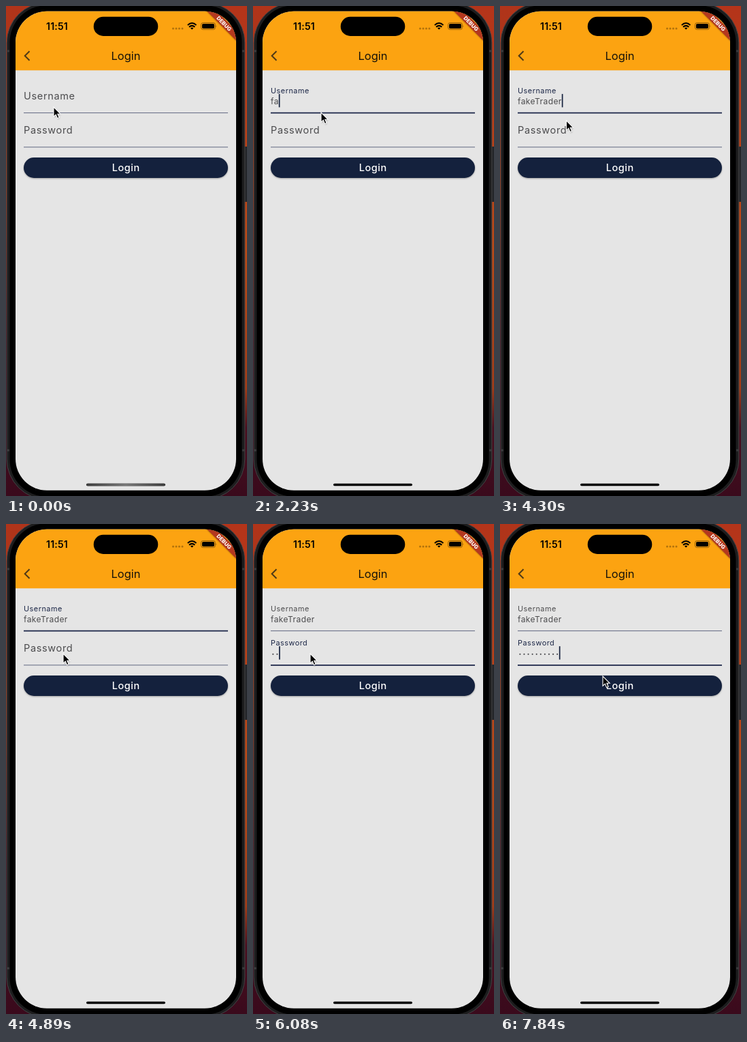
An HTML page that plays this animation: 354 px wide and 718 px high, repeating every 7.99 s.

```html
<!DOCTYPE html>
<html lang="en">
<head>
<meta charset="utf-8">
<title>Login</title>
<style>
  html, body { margin: 0; width: 100%; height: 100%; overflow: hidden; background: #2a0a16; }
  svg { display: block; width: 354px; height: 718px; font-family: Inter, "Open Sans", sans-serif; }
  .label { font-size: 14.5px; letter-spacing: .66px; }
  .value { font-size: 12px; letter-spacing: .42px; fill: #4c4c4e; }
</style>
</head>
<body>
<svg viewBox="0 0 354 718">
  <defs>
    <linearGradient id="wallLeft" x2="0" y2="1">
      <stop offset="0" stop-color="#b0341a"/><stop offset=".35" stop-color="#a83c18"/>
      <stop offset=".7" stop-color="#4a1020"/><stop offset="1" stop-color="#3a0a1c"/>
    </linearGradient>
    <linearGradient id="wallRight" x2="0" y2="1">
      <stop offset="0" stop-color="#b4341a"/><stop offset=".5" stop-color="#b84a18"/>
      <stop offset=".78" stop-color="#a03c18"/><stop offset=".86" stop-color="#4a1020"/>
      <stop offset="1" stop-color="#3a0a1c"/>
    </linearGradient>
    <linearGradient id="shine">
      <stop offset="0" stop-color="#3c3c3c"/><stop offset=".5" stop-color="#777"/><stop offset="1" stop-color="#3c3c3c"/>
    </linearGradient>
    <clipPath id="screen"><rect x="14" y="7.7" width="324" height="702" rx="46"/></clipPath>
    <filter id="soft" x="-20%" y="-60%" width="140%" height="220%"><feGaussianBlur stdDeviation="1.2"/></filter>
  </defs>

  <!-- wallpaper and phone body -->
  <rect width="177" height="718" fill="url(#wallLeft)"/>
  <rect x="177" width="177" height="718" fill="url(#wallRight)"/>
  <path d="M350 206h4v81h-4z" fill="#24262a"/>
  <rect x="1.2" y="-5" width="349.6" height="728" rx="59" fill="#1d1d1e" stroke="#434345"/>
  <rect x="5.5" y="-.8" width="341" height="719.6" rx="54" fill="#000"/>
  <path d="M1 66h4M347 66h4M1 651h4M347 651h4" stroke="#3a3a3c" stroke-width="3"/>

  <!-- app background, bar and debug ribbon -->
  <g clip-path="url(#screen)">
    <rect x="14" y="7" width="324" height="704" fill="#e5e5e5"/>
    <rect x="14" y="7" width="324" height="87.3" fill="#fca311"/>
    <g transform="translate(338 8) rotate(45)">
      <rect x="-36" y="20" width="72" height="10" opacity=".5" filter="url(#soft)"/>
      <rect x="-36" y="20" width="72" height="10" fill="#b4381f"/>
      <text y="27.9" font-size="7.8" font-weight="800" fill="#fff" text-anchor="middle">DEBUG</text>
    </g>
  </g>

  <!-- status bar -->
  <text x="75" y="34.6" font-size="14.1" font-weight="600" letter-spacing=".15" text-anchor="middle">11:51</text>
  <rect x="128.7" y="15.8" width="94.6" height="28.2" rx="14.1"/>
  <path d="M245.5 33h14" stroke="#000" stroke-opacity=".3" stroke-width="3" stroke-linecap="round" stroke-dasharray="0 4.5"/>
  <path d="M266.9 28Q273.2 22 279.5 28M269 30.7Q273.2 27 277.4 30.7" fill="none" stroke="#000" stroke-width="2"/>
  <path d="M271 32.4Q273.2 30.6 275.4 32.4L273.2 34.6Z"/>
  <rect x="286.5" y="24.5" width="21" height="10" rx="3" fill="none" stroke="#000" stroke-opacity=".4"/>
  <rect x="288" y="26" width="18" height="7" rx="1.8"/>
  <path d="M308.5 28v3.2q1.5-1.6 0-3.2" opacity=".45"/>

  <!-- page -->
  <path d="M34.5 66.3L27.7 73L34.5 79.7" fill="none" stroke="#4f3a18" stroke-width="2"/>
  <text x="176" y="79" font-size="16.5" fill="#17130a" text-anchor="middle">Login</text>
  <g id="fields"></g>
  <rect x="26" y="223" width="300" height="30" rx="15" opacity=".3" filter="url(#soft)"/>
  <rect x="26" y="222" width="300" height="30" rx="15" fill="#14213d"/>
  <text x="176.3" y="242.2" font-size="14.5" font-weight="500" letter-spacing=".6" fill="#fff" text-anchor="middle">Login</text>

  <rect x="118" y="699.8" width="116" height="3.5" rx="1.7"/>
  <rect id="glow" x="118" y="699.8" width="116" height="3.5" rx="1.7" fill="url(#shine)"/>
  <rect id="caret" width="1.7" height="19.5" fill="#14213d"/>
  <g id="pointer">
    <path d="M0 0V14.2L3.3 11.2L5.6 16.6L8.1 15.5L5.8 10.3H10.2Z" transform="translate(.6 1.2)" opacity=".3" filter="url(#soft)"/>
    <path d="M0 0V14.2L3.3 11.2L5.6 16.6L8.1 15.5L5.8 10.3H10.2Z" stroke="#fff" stroke-width="1.1"/>
  </g>
</svg>
<script>
const LOOP = 7990, HOLD = 300, BEAT = 147.7;
const LEFT = 26, DOT = 6.08, BLINK = 3;
const TAP_USER = 6, TAP_PASS = 32, TAP_LOGIN = 51;
const $ = id => document.getElementById(id);
const clamp = v => Math.min(1, Math.max(0, v));
const set = (node, attrs) => {
  for (const key in attrs) node.setAttribute(key, attrs[key]);
};

// Pointer legs, timed in beats; equal times make a jump.
const legs = [
  { from: 0, to: 0, x: 60, y: 141 },
  { from: TAP_USER, to: TAP_USER, x: 94, y: 155 },
  { from: TAP_USER, to: 8, x: 100, y: 156 },
  { from: 26, to: 29, x: 90, y: 202 },
  { from: 29, to: 31, x: 84, y: 190 },
  { from: TAP_LOGIN, to: TAP_LOGIN, x: 151, y: 223 }
];
function pointerAt(beat) {
  let x = 70, y = 148;
  for (const leg of legs) {
    if (beat < leg.from) break;
    const p = leg.to > leg.from ? clamp((beat - leg.from) / (leg.to - leg.from)) : 1;
    const eased = p * p * (3 - 2 * p);
    x += (leg.x - x) * eased;
    y += (leg.y - y) * eased;
  }
  return { x, y };
}

// A burst enters one character per beat.
const burst = (start, chars) => [...chars].map((char, i) => ({ char, beat: start + i }));
const userKeys = [...burst(12, 'fake'), ...burst(20, 'T'), ...burst(22, 'rader')];
const passKeys = [...burst(38, '••••'), ...burst(43, '•'), ...burst(45, '••••'), ...burst(48, '•')];

function makeField(name, top, tap, keys) {
  const add = (tag, attrs) => {
    const node = document.createElementNS('http://www.w3.org/2000/svg', tag);
    set(node, attrs);
    return $('fields').appendChild(node);
  };
  const line = add('path', { d: `M26 ${top + 56.6}H326` });
  const label = add('text', { class: 'label' });
  label.textContent = name;
  const text = add('text', { class: 'value', x: LEFT, y: top + 44.2 });
  const dots = add('path', { fill: 'none', stroke: '#3c3c40', 'stroke-width': 2.1,
    'stroke-linecap': 'round', 'stroke-dasharray': `0 ${DOT}` });
  return { top, tap, keys, line, label, text, dots };
}
const user = makeField('Username', 100, TAP_USER, userKeys);
const pass = makeField('Password', 150.2, TAP_PASS, passKeys);

function drawField({ top, tap, line, label }, beat, focused) {
  const float = 1 - (1 - clamp(beat - tap + .8)) ** 2;
  set(label, {
    transform: `translate(${LEFT} ${top + 37 - 9 * float}) scale(${1 - .25 * float})`,
    fill: focused ? '#1c2747' : '#4c4c4e'
  });
  set(line, { stroke: focused ? '#1b2548' : '#626882', 'stroke-width': focused ? 1.7 : 1 });
}

function draw(t) {
  const beat = Math.floor((t - HOLD) / BEAT);
  const active = beat >= TAP_PASS ? pass : beat >= TAP_USER ? user : null;
  drawField(user, beat, active === user);
  drawField(pass, beat, active === pass);

  const typed = field => field.keys.filter(key => key.beat <= beat);
  user.text.textContent = typed(user).map(key => key.char).join('');
  const hidden = typed(pass).length;
  set(pass.dots, { d: hidden ? `M29.4 ${pass.top + 40.6}h${DOT * (hidden - 1) + .01}` : '' });

  // Every key or tap restarts the blink; a tap needs a beat to settle.
  const taps = [TAP_USER, TAP_PASS, TAP_LOGIN].filter(tap => tap <= beat).map(tap => tap + 1);
  const keys = active ? typed(active).map(key => key.beat) : [];
  const idle = beat - Math.max(...taps, ...keys);
  const width = active === pass ? DOT * hidden
    : user.text.textContent && user.text.getComputedTextLength();
  set($('caret'), {
    x: LEFT + Number(width),
    y: (active || user).top + 28.9,
    opacity: active && idle % (2 * BLINK) < BLINK ? 1 : 0
  });

  set($('glow'), { opacity: 1 - clamp((beat - TAP_USER) / 4) });
  const { x, y } = pointerAt(beat);
  set($('pointer'), { transform: `translate(${x} ${y})` });
}

const start = performance.now();
function tick() {
  draw((performance.now() - start) % LOOP);
  requestAnimationFrame(tick);
}
tick();
</script>
</body>
</html>
```
